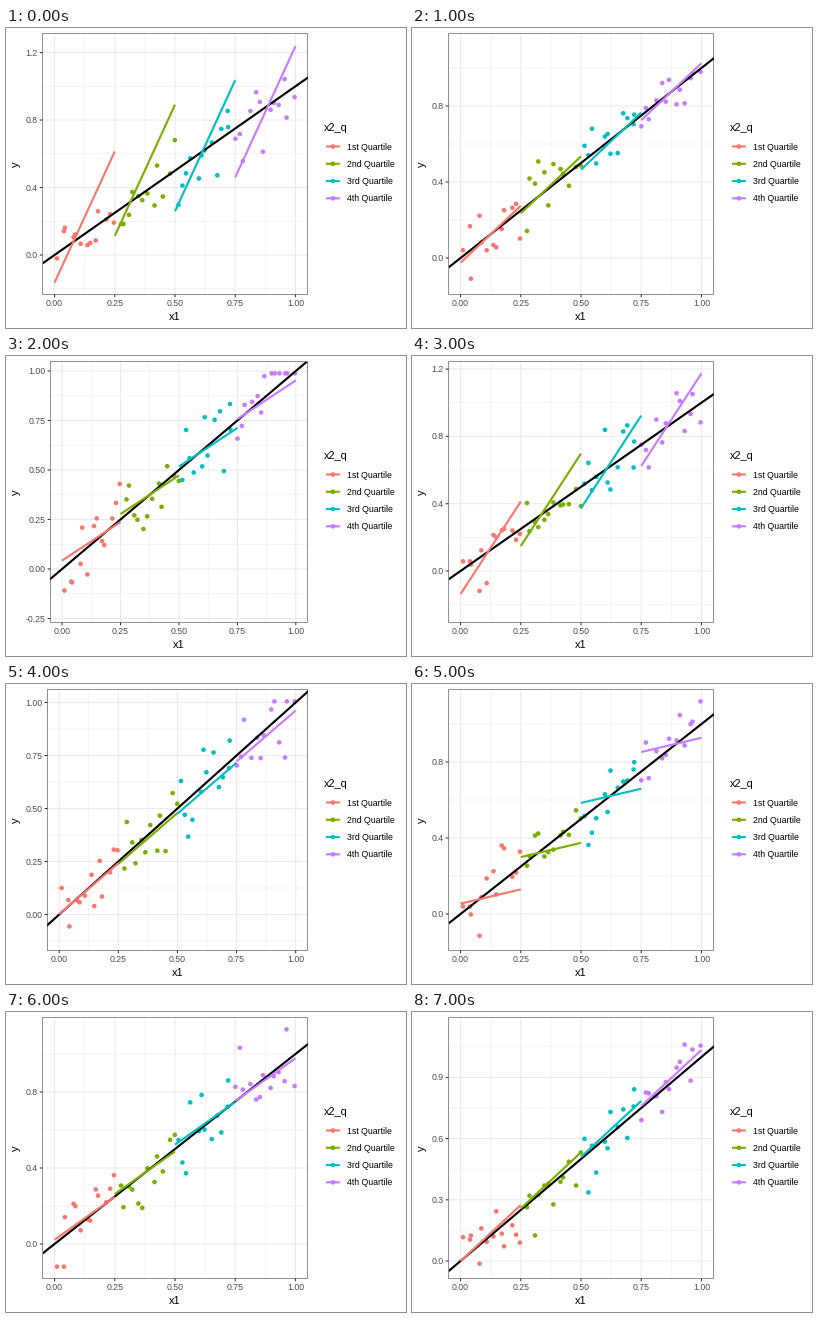
Animation, 400 px wide and 300 px high, one loop 8000 ms. Source, as a matplotlib script:

```python
import numpy as np
import matplotlib
import matplotlib.pyplot as plt
from matplotlib.animation import FuncAnimation
from matplotlib.patches import Circle, Rectangle

matplotlib.rcParams["font.family"] = "Liberation Sans"
matplotlib.rcParams["path.snap"] = False

W, H, DPI = 400, 300, 72
TOP, BOTTOM, RIGHT = 5.5, 266.5, 301.5
PAD = 0.05 / 1.1  # share of the panel left free at each end of an axis
Y_LOW = BOTTOM - PAD * (BOTTOM - TOP)
Y_HIGH = TOP + PAD * (BOTTOM - TOP)

COLORS = ["#F8766D", "#7CAE00", "#00BFC4", "#C77CFF"]
NAMES = ["1st Quartile", "2nd Quartile", "3rd Quartile", "4th Quartile"]
GRID, EDGE, TICK_TEXT = "#EBEBEB", "#333333", "#4D4D4D"
THIN, BOLD = 1.07, 2.13
RADIUS = 2.3
NOISE = 0.085

# One x sample for every scene: 50 strata, one jittered point in each
N = 50
X1 = (np.arange(N) + np.random.default_rng(1).uniform(size=N)) / N
QUARTILE = (4 * X1).astype(int)

# Tick step, stage row of y=0, px per y unit, slope of the quartile lines,
# and the shift of each line's middle off the diagonal
SCENES = [
    (.4, 227, 168.7, 3.11, (.10, .127, .023, -.026)),
    (.4, 230, 190, 1.2, (0, .01, -.01, 0)),
    (.25, 213, 198, .78, (.015, 0, -.01, -.02)),
    (.4, 215, 168.3, 2.2, (.013, .048, .023, .024)),
    (.25, 230.5, 212, .96, (-.003, -.016, -.029, -.033)),
    (.4, 230, 190, .3, (-.033, -.038, -.003, .015)),
    (.4, 232, 190, .9, (.01, 0, .01, -.01)),
    (.3, 249, 204, 1.1, (.012, .02, .022, .022)),
]

fig = plt.figure(figsize=(W / DPI, H / DPI), dpi=DPI, facecolor="white")
ax = fig.add_axes([0, 0, 1, 1])


def line(xs, ys, color, width, z, clip=None):
    art, = ax.plot(xs, ys, color=color, lw=width, zorder=z, solid_capstyle="butt")
    if clip is not None:
        art.set_clip_path(clip)


def dot(x, y, color, z):
    ax.add_patch(Circle((x, y), RADIUS, color=color, lw=0, zorder=z))


def text(x, y, s, size=8.8, color="black", ha="left", rotation=0):
    ax.text(x, y, s, fontsize=size, color=color, ha=ha, va="baseline",
            rotation=rotation, rotation_mode="anchor")


def draw_legend():
    text(318, 103, "x2_q", 11)
    for k, (name, color) in enumerate(zip(NAMES, COLORS)):
        y = 118.5 + 17.28 * k
        line([320, 333.8], [y, y], color, BOLD, 4)
        dot(326.9, y, color, 4)
        text(341, y + 3.1, name)


def draw(i):
    ax.clear()
    ax.set(xlim=(0, W), ylim=(H, 0))
    ax.axis("off")
    step, zero, unit, slope, shifts = SCENES[i]

    ticks = [(k * step, zero - k * step * unit) for k in range(-2, 8)]
    ticks = [(v, y) for v, y in ticks if TOP < y < BOTTOM]
    digits = 2 if step == .25 else 1
    # wider tick labels push the panel's left side in
    left = 36.5 + 4.9 * (digits - 1) + (3 if ticks[0][0] < 0 else 0)
    span = (RIGHT - left) / 1.1

    def px(x):
        return left + PAD * (RIGHT - left) + span * np.asarray(x)

    def py(y):
        return zero - unit * np.asarray(y)

    panel = Rectangle((left, TOP), RIGHT - left, BOTTOM - TOP, fill=False,
                      ec=EDGE, lw=THIN / 2, zorder=6)
    ax.add_patch(panel)

    for k in range(-5, 16):
        y = py(k * step / 2)
        if TOP < y < BOTTOM:
            line([left, RIGHT], [y, y], GRID, THIN / (1 + k % 2), 1)
    for k in range(9):
        x = px(k / 8)
        line([x, x], [TOP, BOTTOM], GRID, THIN / (1 + k % 2), 1)

    for v, y in ticks:
        line([left - 2.75, left], [y, y], EDGE, THIN, 5)
        text(left - 4.95, y + 3.1, f"{v:.{digits}f}", color=TICK_TEXT, ha="right")
    for k in range(5):
        x = px(k / 4)
        line([x, x], [BOTTOM, BOTTOM + 2.75], EDGE, THIN, 5)
        text(x, 278.5, f"{k / 4:.2f}", color=TICK_TEXT, ha="center")
    text((left + RIGHT) / 2, 292, "x1", 11, ha="center")
    text(13.4, 136, "y", 11, ha="center", rotation=90)

    noise = np.random.default_rng(20 + i).normal(0, NOISE, N)
    rows = np.clip(py(X1 + noise), Y_HIGH, Y_LOW)
    for x, y, q in zip(px(X1), rows, QUARTILE):
        dot(x, y, COLORS[q], 2)

    ends = np.array([-.1, 1.1])
    line(px(ends), py(ends), "black", BOLD, 3, panel)
    half = np.array([-.125, .125])
    for k, (shift, color) in enumerate(zip(shifts, COLORS)):
        mid = (k + .5) / 4
        line(px(mid + half), py(mid + shift + slope * half), color, BOLD, 4, panel)
    draw_legend()
    return []


anim = FuncAnimation(fig, draw, frames=len(SCENES), interval=1000,
                     repeat=True, repeat_delay=0, blit=False)
plt.show()
```
